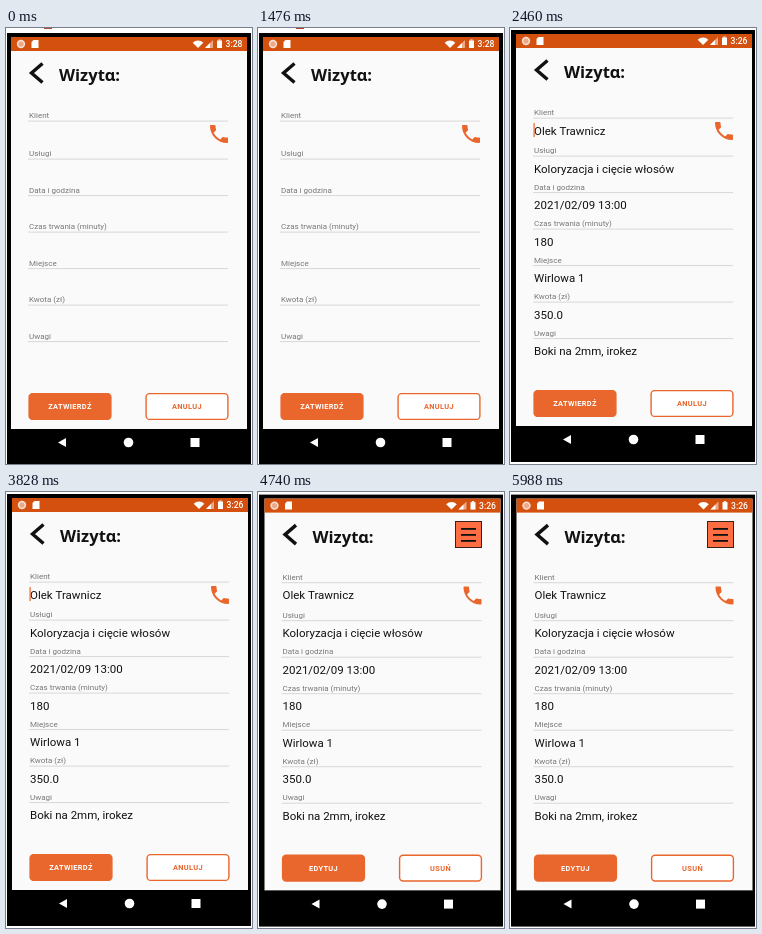
Recreate the animation shown at these times as an HTML page with a canvas. Size 246 by 436 pixels, loop 6820 ms.

```html
<!DOCTYPE html>
<html lang="pl">
<head>
<meta charset="utf-8">
<title>Wizyta</title>
<style>
  html, body { margin: 0; width: 100%; height: 100%; overflow: hidden; background: #fff; }
  canvas { display: block; width: 246px; height: 436px; }
</style>
</head>
<body>
<canvas id="stage"></canvas>
<script>
const W = 246, H = 436, LOOP = 6820;
const ORANGE = '#e9662d', BAR = '#d4500f', INK = '#111', SCREEN = '#fafafa';
const canvas = document.getElementById('stage');
const ctx = canvas.getContext('2d');
const ratio = window.devicePixelRatio || 1;
canvas.width = W * ratio;
canvas.height = H * ratio;

const fields = [
  ['Klient', 'Olek Trawnicz'],
  ['Usługi', 'Koloryzacja i cięcie włosów'],
  ['Data i godzina', '2021/02/09 13:00'],
  ['Czas trwania (minuty)', '180'],
  ['Miejsce', 'Wirlowa 1'],
  ['Kwota (zł)', '350.0'],
  ['Uwagi', 'Boki na 2mm, irokez']
];

const scenes = [
  { until: 2460, x: 0, y: 0, clock: '3:28', buttons: ['ZATWIERDŹ', 'ANULUJ'], edge: true },
  { until: 4740, x: 1, y: -3, clock: '3:26', buttons: ['ZATWIERDŹ', 'ANULUJ'], filled: true, caret: true },
  { until: LOOP, x: 1.5, y: -2.4, clock: '3:26', buttons: ['EDYTUJ', 'USUŃ'], filled: true, menu: true }
];

const handset = new Path2D('M6.62 10.79c1.44 2.83 3.76 5.14 6.59 6.59l2.2-2.2c.27-.27.67-.36 1.02-.24 1.12.37 2.33.57 3.57.57.55 0 1 .45 1 1V20c0 .55-.45 1-1 1-9.39 0-17-7.61-17-17 0-.55.45-1 1-1h3.5c.55 0 1 .45 1 1 0 1.25.2 2.45.57 3.57.11.35.03.74-.25 1.02z');

function rect(x, y, w, h, color) {
  ctx.fillStyle = color;
  ctx.fillRect(x, y, w, h);
}

function poly(points, color) {
  ctx.fillStyle = color;
  ctx.beginPath();
  points.forEach(([x, y]) => ctx.lineTo(x, y));
  ctx.fill();
}

function disc(x, y, r, color) {
  ctx.fillStyle = color;
  ctx.beginPath();
  ctx.arc(x, y, r, 0, Math.PI * 2);
  ctx.fill();
}

function text(str, x, y, size, color, { weight = 400, family = 'Roboto', align = 'left', spacing = 0 } = {}) {
  ctx.font = `${weight} ${size}px ${family}, sans-serif`;
  ctx.letterSpacing = spacing + 'px';
  ctx.textAlign = align;
  ctx.fillStyle = color;
  ctx.fillText(str, x, y);
}

function statusBar(clock) {
  rect(5, 9, 236, 14, BAR);
  disc(15, 16, 4.2, '#f8ddd0');
  disc(15, 16, 2.6, '#eba98a');
  poly([[27.5, 12], [32.5, 12], [32.5, 20], [25.5, 20], [25.5, 14]], '#fff');
  ctx.beginPath();
  ctx.moveTo(192, 20);
  ctx.arc(192, 20, 7.5, -Math.PI * 0.75, -Math.PI * 0.25);
  ctx.fill();
  poly([[207, 12], [207, 20], [199, 20]], '#eba98a');
  poly([[204, 15], [204, 20], [199, 20]], '#fff');
  rect(211, 12.5, 5, 7.5, '#fff');
  rect(212.4, 11.5, 2.2, 1, '#fff');
  text(clock, 219.5, 19, 8.6, '#fff', { weight: 500 });
}

function header(menu) {
  ctx.strokeStyle = INK;
  ctx.lineWidth = 3.4;
  ctx.beginPath();
  ctx.moveTo(36.5, 35.5);
  ctx.lineTo(25.5, 45);
  ctx.lineTo(36.5, 54.5);
  ctx.stroke();
  // U+0251 gives the single-storey "a" of a geometric face
  text('Wizyt\u0251:', 53, 53.2, 16.6, INK, { weight: 600, family: '"Noto Sans"' });
  if (!menu) return;
  rect(195.5, 31.4, 27, 27, '#3a2018');
  rect(196.5, 32.4, 25, 25, '#ff6e42');
  for (let i = 0; i < 3; i++) rect(201.5, 38.4 + i * 6, 15, 1.8, INK);
}

function form(filled, caret) {
  fields.forEach(([label, value], i) => {
    const y = i ? 128 + (i - 1) * 36.5 : 90;
    text(label, 23, y, 8, '#777');
    rect(22, y + 2.6, 200, 1, '#d8d8d8');
    if (filled) text(value, 23, y + 19.7, 11.5, INK);
  });
  if (caret) rect(22.5, 98, 1.2, 14, ORANGE);
  ctx.save();
  ctx.translate(201, 94);
  ctx.fillStyle = ORANGE;
  ctx.fill(handset);
  ctx.restore();
}

function button(x, label, solid) {
  ctx.beginPath();
  ctx.roundRect(x + 0.6, 365.6, 81.8, 25.8, 3.5);
  ctx.fillStyle = solid ? ORANGE : '#fff';
  ctx.fill();
  ctx.strokeStyle = ORANGE;
  ctx.lineWidth = 1.4;
  ctx.stroke();
  text(label, x + 41.5, 381.3, 7.4, solid ? '#fff' : ORANGE, { weight: 600, align: 'center', spacing: 0.35 });
}

function navBar() {
  rect(5, 401, 236, 34, '#000');
  poly([[52, 414.5], [60, 410], [60, 419]], '#fff');
  disc(122.5, 414.5, 4.8, '#fff');
  rect(184.5, 410, 9, 9, '#fff');
}

function draw(scene) {
  ctx.setTransform(ratio, 0, 0, ratio, 0, 0);
  rect(0, 0, W, H, '#fff');
  if (scene.edge) rect(38, 0, 8, 1, '#b5442c');
  rect(1, 5 + scene.y, 244, 432, '#000');
  ctx.translate(scene.x, scene.y);
  rect(5, 9, 236, 392, SCREEN);
  statusBar(scene.clock);
  header(scene.menu);
  form(scene.filled, scene.caret);
  button(22.5, scene.buttons[0], true);
  button(139.5, scene.buttons[1], false);
  navBar();
}

const start = performance.now();
function tick() {
  const time = (performance.now() - start) % LOOP;
  draw(scenes.find(scene => time < scene.until));
  requestAnimationFrame(tick);
}
tick();
</script>
</body>
</html>
```
